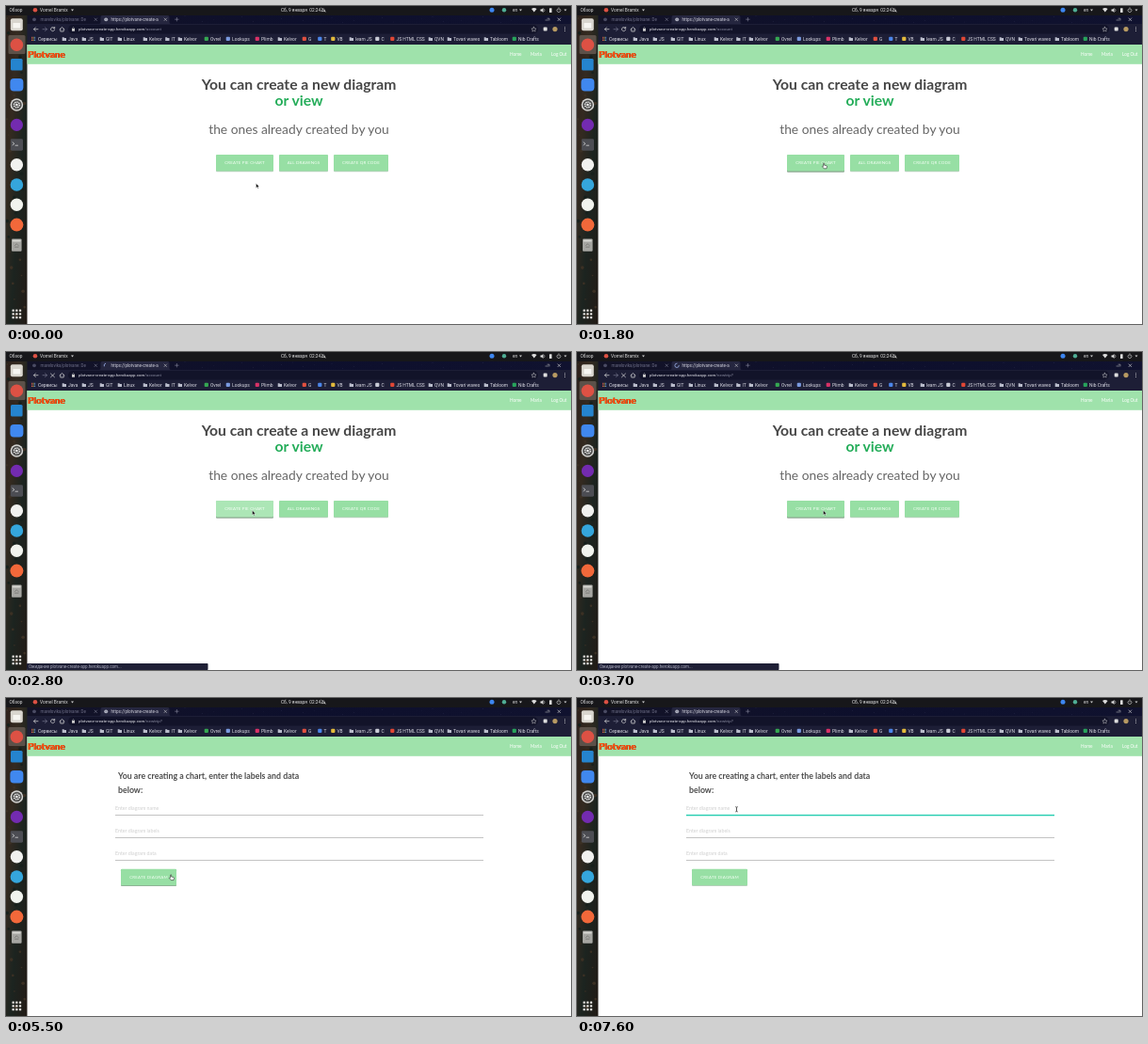
An HTML page that plays this animation: 600x338 px, repeating every 8000 ms.

```html
<!DOCTYPE html>
<html lang="ru">
<head>
<meta charset="utf-8">
<title>Chart builder</title>
<style>
html, body { margin: 0; width: 100%; height: 100%; overflow: hidden; background: #fff; }
svg { display: block; width: 100vw; height: 100vh; }
text { font-family: Roboto, "Open Sans", sans-serif; white-space: pre; }
.lato { font-family: Lato, sans-serif; }
.bold { font-weight: 700; }
.mid { text-anchor: middle; }
.line { fill: none; stroke-linecap: round; stroke-linejoin: round; }
#brand { text-shadow: .5px .4px 0 #8e2409, -.2px 0 0 #ff3d00; }
</style>
</head>
<body>
<svg id="stage" viewBox="0 0 600 338" preserveAspectRatio="none">
  <defs>
    <linearGradient id="wall" x1="0" y1="0" x2="1" y2="1">
      <stop offset="0" stop-color="#2d211c"/>
      <stop offset=".3" stop-color="#342a20"/>
      <stop offset=".6" stop-color="#1c2420"/>
      <stop offset="1" stop-color="#231b16"/>
    </linearGradient>
    <linearGradient id="strip" x1="0" y1="0" x2="1" y2="0">
      <stop offset="0" stop-color="#131327"/>
      <stop offset=".5" stop-color="#0d0f2c"/>
      <stop offset="1" stop-color="#10122f"/>
    </linearGradient>
    <clipPath id="pieClip"><rect x="223" y="158" width="61" height="17.5" rx="1"/></clipPath>
    <path id="arrow" d="M0 0V5L1.2 3.9L2 5.6L2.8 5.2L2 3.6H3.5Z" fill="#111" stroke="#fff" stroke-width=".4"/>
    <path id="hand" d="M-.4 0C0-.6 .6-.4 .6 .2V2L3 2.5Q3.6 2.7 3.5 3.5L3 5.6H.2L-1.6 3.4Q-1.5 2.7-.4 3.2Z" fill="#fff" stroke="#222" stroke-width=".55"/>
    <path id="beam" d="M-1.2-2.6Q0-2.6 0-2Q0-2.6 1.2-2.6M0-2V2M-1.2 2.6Q0 2.6 0 2Q0 2.6 1.2 2.6" fill="none" stroke="#222" stroke-width=".75"/>
  </defs>

  <rect width="600" height="338" fill="#fff"/>
  <g id="browser"></g>
  <g id="dock"></g>
  <g id="head"></g>
  <g id="menuPage"></g>
  <g id="formPage"></g>
  <g id="status"></g>
  <use id="cursor"/>
</svg>
<script>
const NS = "http://www.w3.org/2000/svg";
const HOST = "plotvane-create-app.herokuapp.com";
const $ = id => document.getElementById(id);

function add(parent, tag, attrs, content) {
  const el = document.createElementNS(NS, tag);
  for (const key in attrs) el.setAttribute(key, attrs[key]);
  if (content) el.textContent = content;
  return parent.appendChild(el);
}
const box = (g, x, y, width, height, fill, rx = 0) =>
  add(g, "rect", { x, y, width, height, fill, rx });
const dot = (g, cx, cy, r, fill) => add(g, "circle", { cx, cy, r, fill });
const label = (g, x, y, size, fill, str, cls = "") =>
  add(g, "text", { x, y, "font-size": size, fill, class: cls }, str);
const stroke = (g, d, color = "#ddd", width = .7) =>
  add(g, "path", { d, stroke: color, "stroke-width": width, class: "line" });

function buildBrowser(g) {
  // system bar
  box(g, 0, 0, 600, 10, "#17171a");
  label(g, 3.5, 6, 4.8, "#ddd", "Обзор");
  dot(g, 31, 4.3, 2.3, "#dd5144");
  label(g, 36, 6, 4.8, "#ddd", "Vornel Bramix");
  add(g, "path", { d: "M69 3.5h3l-1.5 2z", fill: "#ccc" });
  label(g, 292, 6, 4.8, "#e4e4e4", "Сб, 9 января  02:24");
  stroke(g, "M335 5.6h4M335.6 5.4V3.8Q337 1.5 338.4 3.8V5.4M335 2l4 4.2", "#ddd", .6);
  dot(g, 516, 4.3, 2.5, "#3d86f0");
  dot(g, 529, 4.3, 2.2, "#4fae95");
  label(g, 538, 6, 4.8, "#ddd", "en");
  add(g, "path", { d: "M545 3.5h3l-1.5 2z", fill: "#ccc" });
  add(g, "path", { d: "M558 3q2.8-2 5.6 0L560.8 6.6z", fill: "#ddd" });
  add(g, "path", { d: "M567.5 3.5h1.4l1.6-1.4v4.8l-1.6-1.4h-1.4z", fill: "#ddd" });
  stroke(g, "M571.6 3.2q1 1.2 0 2.5", "#ddd", .5);
  box(g, 577, 2.2, 2.6, 4.8, "#ddd", .5);
  stroke(g, "M585.8 3a2 2 0 1 0 2.4 0M587 1.8v2.4", "#ddd", .6);
  add(g, "path", { d: "M592.5 3.5h3l-1.5 2z", fill: "#ccc" });

  // tabs
  box(g, 22, 10, 578, 9, "url(#strip)");
  for (let i = 0; i < 26; i++)
    dot(g, 190 + (i * 137.3) % 370, 10.7 + (i * 2.9) % 7, .22, "#55597e");
  add(g, "path", { d: "M99 19q1.5 0 1.5-2v-5q0-2 2-2h69q2 0 2 2v5q0 2 1.5 2z", fill: "#25263f" });
  dot(g, 30, 14.3, 1.9, "#4a4b63");
  label(g, 36.5, 15.6, 4.5, "#6f7088", "marelovika/plotvane: De");
  stroke(g, "M94 13l2.6 2.6M96.6 13L94 15.6", "#8f90a4", .5);
  label(g, 111.5, 15.6, 4.6, "#d5d5df", "https://plotvane-create-a");
  stroke(g, "M168 13l2.6 2.6M170.6 13l-2.6 2.6", "#ddd", .5);
  stroke(g, "M179.6 14.2h3.6M181.4 12.4V16", "#9c9db0", .5);
  stroke(g, "M573 15h3M575 13.2h2v1.8", "#ccc", .5);
  stroke(g, "M586 12.9l2.8 2.8M588.8 12.9L586 15.7", "#ddd", .6);

  // toolbar
  box(g, 22, 19, 578, 22, "#1d1e36");
  box(g, 66, 20, 499, 9.4, "#121329", 4.7);
  stroke(g, "M34 24.7h-4.4M31.4 22.8l-1.9 1.9 1.9 1.9");
  stroke(g, "M39 24.7h4.4M41.6 22.8l1.9 1.9-1.9 1.9", "#777990");
  stroke(g, "M57 24.8l2.5-2.3 2.5 2.3M57.8 24.5v2.5h3.4v-2.5");
  box(g, 70, 24, 3, 2.7, "#ccc", .3);
  stroke(g, "M70.7 24v-.8q.8-1.4 1.6 0v.8", "#ccc", .5);
  const url = label(g, 77, 26.2, 4.4, "#ececf2", HOST);
  add(url, "tspan", { id: "path", fill: "#8d8ea3" }, "/account");
  stroke(g, "M560.5 22.2l.8 1.7 1.8.2-1.3 1.2.3 1.8-1.6-.9-1.6.9.3-1.8-1.3-1.2 1.8-.2z", "#ccc", .5);
  box(g, 570.7, 22.6, 4, 4, "#ddd", .8);
  dot(g, 583, 24.6, 2.6, "#b79a62");
  [22.8, 24.6, 26.4].forEach(y => dot(g, 593.5, y, .5, "#ddd"));

  // bookmarks: x, text, icon colour (blank means a folder)
  [[66, "Java"], [87, "JS"], [106, "GIT"], [125, "Linux"], [152, "Kelvor"], [175.5, "IT"],
   [189, "Kelvor"], [217, "Ovrel", "#35a852"], [240, "Lookups", "#7a9ae0"],
   [271, "Plimb", "#d93267"], [295, "Kelvor"], [321, "G", "#e0503f"], [337.5, "T", "#4c86ea"],
   [351.5, "VB", "#e3ba3c"], [371, "learn JS"], [398.5, "C", "#c9cbd6"],
   [414.5, "JS HTML CSS", "#e04735"], [455, "QVN"], [475, "Tovari waves"],
   [514, "Tabloom"], [544, "Nib Crafts", "#27a35b"]
  ].forEach(([x, str, color]) => {
    if (color) box(g, x - 6.3, 32.8, 4.2, 4.2, color, 1);
    else add(g, "path", { d: `M${x - 6.3} 33.2h1.7l.6.7h2v3h-4.3z`, fill: "#b9bccb" });
    label(g, x, 36.7, 4.9, "#dddde6", str);
  });
  for (let i = 0; i < 9; i++)
    box(g, 27 + i % 3 * 1.6, 32.8 + Math.floor(i / 3) * 1.6, 1, 1, ["#d95a4c", "#d9b84c", "#5a9be0"][i % 3]);
  label(g, 34, 36.7, 4.9, "#dddde6", "Сервисы");
  stroke(g, "M47.5 23l4 3.8M51.5 23l-4 3.8").id = "stop";
  stroke(g, "M51.4 23.4a2.1 2.1 0 1 0 .3 1.8M51.7 22.3v1.5h-1.5").id = "reload";
  const tabIcon = add(g, "g", { id: "favicon" });
  dot(tabIcon, 106.2, 14.3, 1.9, "#c9cad6");
  stroke(tabIcon, "M104.5 14.3h3.4M106.2 12.6v3.4", "#555770", .4);
  stroke(g, "M106.2 12.2a2.2 2.2 0 0 1 2.2 2.2", "#9fb4ea", .8).id = "spinner";
}

function buildDock(g) {
  box(g, 0, 10, 22.5, 328, "url(#wall)");
  for (let i = 0; i < 40; i++)
    dot(g, (i * 7.7) % 20 + 1, 12 + (i * 83.1) % 324, .8 + i % 3 * .5, i % 2 ? "#3b3024" : "#17201c");
  box(g, 2.5, 31, 18, 20, "#5c5149", 1.5);
  box(g, 4.8, 13.2, 13, 13, "#d9d6cf", 2);
  box(g, 7.4, 18, 7.8, 5.5, "#f6f5f1", .6);
  dot(g, 11.4, 41.2, 6.8, "#dd5144");
  box(g, 5, 56, 12.6, 12.6, "#2584ce", 1.5);
  box(g, 4.4, 77, 14, 13.6, "#4088ef", 4);
  dot(g, 11.4, 105, 6.8, "#d6d6d4");
  dot(g, 11.4, 105, 5.3, "#50504f");
  add(g, "circle", { cx: 11.4, cy: 105, r: 2.9, fill: "none", stroke: "#eee", "stroke-width": 1.4, "stroke-dasharray": "1.5 .7" });
  dot(g, 11.4, 105, 1.3, "#eee");
  dot(g, 11.4, 126.4, 6.6, "#732bb0");
  box(g, 4.8, 141.3, 13.2, 12.4, "#4c4d53", 1.4);
  stroke(g, "M7 144.8l1.8 1.5L7 147.8M10 148.2h2.5", "#eee", .7);
  dot(g, 11.4, 168.7, 6.7, "#f1f1ef");
  dot(g, 11.4, 190, 6.8, "#35a6dc");
  dot(g, 11.4, 211.2, 6.7, "#f1f3ee");
  dot(g, 11.4, 232.6, 7, "#f2683a");
  box(g, 6, 247.5, 10.6, 13.2, "#a6a6a2", 1);
  box(g, 7, 248.5, 8.6, 2, "#d4d4cf", .5);
  stroke(g, "M9.5 254.5l1.8-1.8 1.8 1.8M9.5 256.2h3.6", "#6d6d69", .7);
  for (let i = 0; i < 9; i++)
    box(g, 6.5 + i % 3 * 3.7, 322.5 + Math.floor(i / 3) * 3.7, 2.3, 2.3, "#e6e4e1", .5);
}

function buildHead(g) {
  box(g, 22.5, 41, 577.5, 20.8, "#9fe2ab");
  label(g, 23, 54.8, 10.1, "#ff5714", "Plotvane", "lato bold").id = "brand";
  [[535, "Home"], [557, "Marla"], [579, "Log Out"]].forEach(([x, str]) =>
    label(g, x, 53, 4.7, "#fff", str, "lato"));
}

function button(g, x, y, w, str) {
  const shade = box(g, x, y + .6, w, 17.7, "#6f8f75", 1);
  shade.setAttribute("opacity", .45);
  box(g, x, y, w, 17.5, "#97dfa4", 1);
  const t = label(g, x + w / 2, y + 10.4, 4.5, "#f4fff5", str, "lato mid");
  t.setAttribute("letter-spacing", .15);
  return shade;
}

function buildMenu(g) {
  label(g, 311, 89, 15.7, "#464646", "You can create a new diagram", "lato bold mid");
  label(g, 311, 106, 15.7, "#25ad5a", "or view", "lato bold mid");
  label(g, 311, 136.4, 13.8, "#666", "the ones already created by you", "lato mid");
  button(g, 223, 158, 61, "CREATE PIE CHART").id = "pieShade";
  add(g, "circle", { id: "ripple", cx: 262, cy: 168, fill: "#fff", "clip-path": "url(#pieClip)" });
  button(g, 290, 158, 52, "ALL DRAWINGS");
  button(g, 348, 158, 58, "CREATE QR CODE");
}

function buildForm(g) {
  label(g, 119, 85.6, 8.8, "#4c4c4c", "You are creating a chart, enter the labels and data", "lato bold");
  label(g, 119, 100.6, 8.8, "#4c4c4c", "below:", "lato bold");
  ["name", "labels", "data"].forEach((str, i) => {
    const y = 119 + i * 24;
    label(g, 116, y, 5.3, "#cfcfcf", "Enter diagram " + str, "lato");
    box(g, 116, y + 5.1, 391, .7, "#a9a9a9");
  });
  box(g, 116, 123.9, 391, 1.4, "#26cdb0").id = "focus";
  box(g, 115.7, 114.7, .8, 5.2, "#222").id = "caret";
  button(g, 122, 181.7, 59, "CREATE DIAGRAM").id = "formShade";
}

function buildStatus(g) {
  box(g, 22, 331, 192.5, 7, "#1f2036", .8);
  label(g, 24, 336.2, 4.5, "#a9aabd", `Ожидание ${HOST}...`);
}

buildBrowser($("browser"));
buildDock($("dock"));
buildHead($("head"));
buildMenu($("menuPage"));
buildForm($("formPage"));
buildStatus($("status"));

// pointer track: time, x, y, shape from that time on
const track = [
  [0, 265.5, 188.5, "arrow"], [200, 265.5, 188.5, "arrow"], [700, 264, 174, "hand"],
  [1100, 262, 167.2, "hand"], [2500, 261.5, 168.3, "arrow"], [3800, 262, 167.2, "hand"],
  [4700, 262, 167.2, "hand"], [4800, 260, 169, "arrow"], [5000, 252, 175, "arrow"],
  [5400, 186, 190, "arrow"], [5500, 175, 188, "hand"], [5700, 168, 172, "beam"],
  [6000, 166.3, 123, "beam"], [6300, 166.3, 117.3, "beam"],
  [7300, 166.3, 117.3, "beam"], [7600, 169.5, 118.3, "beam"], [8000, 169.5, 118.3, "beam"]
];
const holds = new Set([1100, 2500]);

const clamp = v => Math.max(0, Math.min(1, v));
const ramp = (t, from, to) => clamp((t - from) / (to - from));
const show = (id, on) => $(id).setAttribute("display", on ? "inline" : "none");
const set = (id, key, value) => $(id).setAttribute(key, value);

function movePointer(t) {
  let i = track.length - 2;
  while (track[i][0] > t) i--;
  const [t0, x0, y0, shape] = track[i], [t1, x1, y1] = track[i + 1];
  const p = holds.has(t0) ? 0 : ramp(t, t0, t1);
  set("cursor", "href", "#" + shape);
  set("cursor", "transform", `translate(${x0 + (x1 - x0) * p} ${y0 + (y1 - y0) * p})`);
}

function render(now) {
  const t = Math.floor(now % 8000 / 100) * 100;
  const busy = t >= 2500 && t < 3800;
  const spin = t >= 2500 && t < 4000;
  movePointer(t);

  show("menuPage", t < 3800);
  show("formPage", t >= 3800);
  show("status", t >= 2600 && t < 4200);
  show("stop", busy);
  show("reload", !busy);
  show("spinner", spin);
  show("favicon", !spin);
  const loading = t >= 3200;
  set("spinner", "transform", `rotate(${loading ? (t - 3200) * .5 + 200 : -(t - 2500) * .36} 106.2 14.3)`);
  set("spinner", "d", loading ? "M106.2 12.2a2.2 2.2 0 1 1-2.2 2.2" : "M106.2 12.2a2.2 2.2 0 0 1 2.2 2.2");
  $("path").textContent = t < 3400 ? "/account" : "/newtrip?";

  const hover = ramp(t, 600, 1100);
  set("pieShade", "opacity", .45 + .35 * hover);
  set("pieShade", "height", 17.7 + .5 * hover);
  set("ripple", "r", 46 * ramp(t, 2200, 2800));
  set("ripple", "opacity", .2 * (1 - ramp(t, 2800, 3300)));
  set("formShade", "opacity", t >= 5500 && t < 5700 ? .8 : .45);

  set("focus", "opacity", ramp(t, 6800, 7100));
  show("caret", t >= 6800 && t < 7400);
}

function tick() {
  render(performance.now());
  requestAnimationFrame(tick);
}
tick();
</script>
</body>
</html>
```
